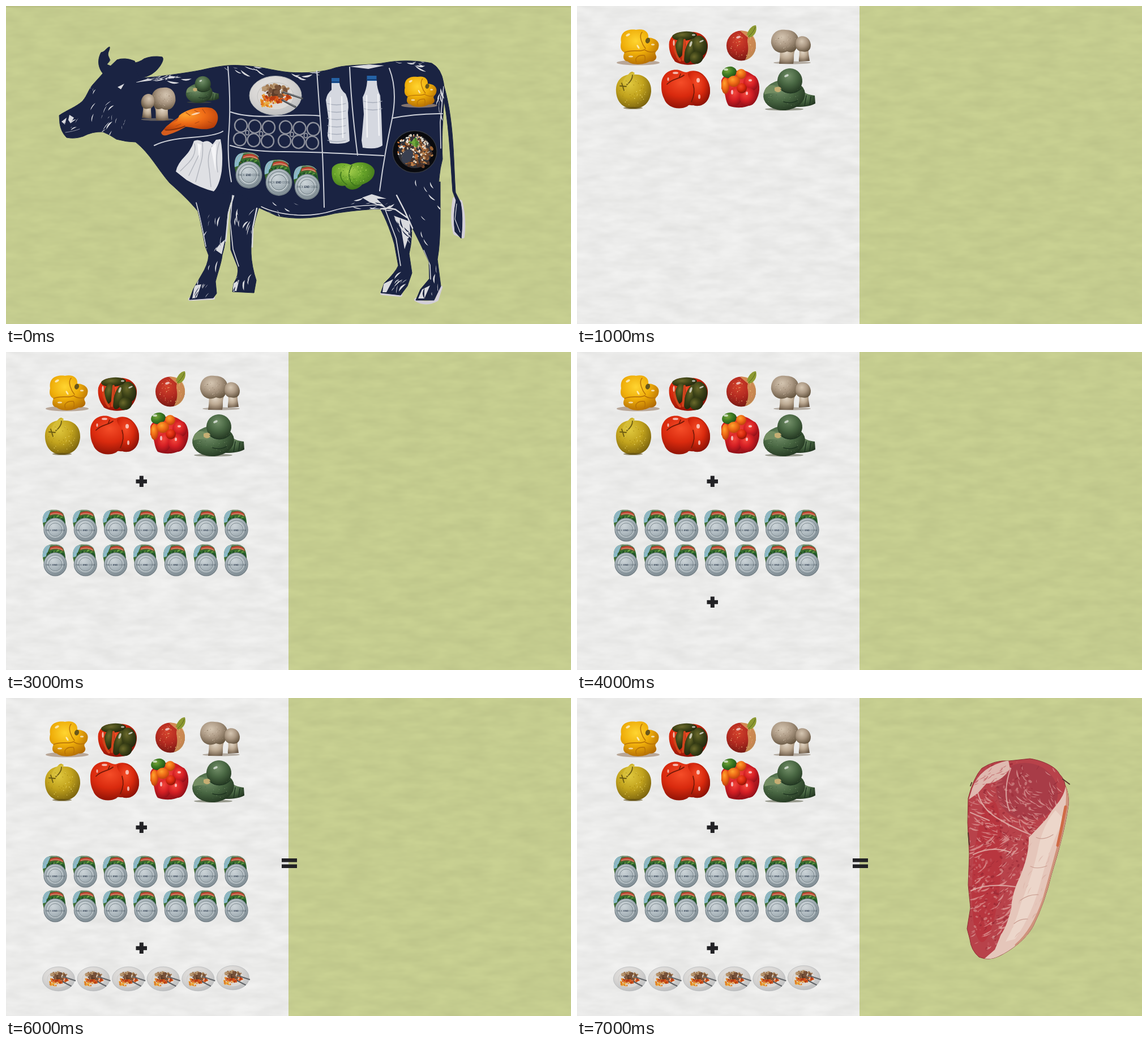
Write an HTML page that moves like this. It is 998 px wide and 561 px high and loops after 8 s.

```html
<!DOCTYPE html>
<html lang="en">
<head>
<meta charset="utf-8">
<title>Food waste</title>
<style>
html, body { margin: 0; width: 100%; height: 100%; overflow: hidden; background: #c4cc8e; }
svg { display: block; width: 100vw; height: 100vh; }
</style>
</head>
<body>
<svg id="stage" viewBox="0 0 998 561" preserveAspectRatio="none"></svg>
<script>
const LOOP = 8000;
const NAVY = '#1a2342', CHALK = '#d9dade', INK = '#222225';

function rng(seed) {
  return () => {
    seed = seed + 0x6D2B79F5 | 0;
    let t = Math.imul(seed ^ seed >>> 15, 1 | seed);
    t = t + Math.imul(t ^ t >>> 7, 61 | t) ^ t;
    return ((t ^ t >>> 14) >>> 0) / 4294967296;
  };
}
const range = (n, f) => Array.from({ length: n }, (_, i) => f(i)).join('');
const path = (d, fill, extra = '') => `<path d="${d}" fill="${fill}" ${extra}/>`;
const line = (d, color, w = 1, extra = '') =>
  `<path d="${d}" fill="none" stroke="${color}" stroke-width="${w}" stroke-linecap="round" stroke-linejoin="round" ${extra}/>`;
const oval = (x, y, rx, ry, fill, turn = 0, extra = '') =>
  `<ellipse cx="${x}" cy="${y}" rx="${rx}" ry="${ry}" fill="${fill}" transform="rotate(${turn} ${x} ${y})" ${extra}/>`;
const box = (x, y, w, h, fill) => `<rect x="${x}" y="${y}" width="${w}" height="${h}" fill="${fill}"/>`;
const glow = (id, ...colors) => `<radialGradient id="${id}" cx=".4" cy=".33" r=".72">` +
  colors.map((c, i) => `<stop offset="${i / (colors.length - 1)}" stop-color="${c}"/>`).join('') + '</radialGradient>';
const shine = (x, y, rx = 3, ry = 1.5, turn = 0) => oval(x, y, rx, ry, '#fff', turn, 'opacity=".65"');

// Random dabs inside an ellipse.
function dabs(seed, n, x, y, rx, ry, size, colors) {
  const r = rng(seed);
  return range(n, () => {
    const a = r() * 6.283, d = Math.sqrt(r()), s = size * (.6 + r() * .8);
    const color = colors[Math.floor(r() * colors.length)];
    return oval((x + Math.cos(a) * d * rx).toFixed(1), (y + Math.sin(a) * d * ry).toFixed(1),
      s.toFixed(1), (s * .65).toFixed(1), color, Math.round(r() * 180));
  });
}

// Random slivers inside a box, leaning along the given angle.
function slivers(seed, n, x, y, w, h, angle, len) {
  const r = rng(seed);
  let d = '';
  for (let i = 0; i < n; i++) {
    const a = (angle + (r() - .5) * 50) * Math.PI / 180, l = len * (.4 + r());
    const dx = Math.cos(a) * l, dy = Math.sin(a) * l, k = .14 + r() * .24;
    d += `M${(x + r() * w).toFixed(1)} ${(y + r() * h).toFixed(1)}` +
      `q${(dx / 2 - dy * k).toFixed(1)} ${(dy / 2 + dx * k).toFixed(1)} ${dx.toFixed(1)} ${dy.toFixed(1)}` +
      `q${(-dx / 2 - dy * .05).toFixed(1)} ${(-dy / 2).toFixed(1)} ${(-dx).toFixed(1)} ${(-dy).toFixed(1)}z`;
  }
  return d;
}

const gradients =
  glow('yellow', '#ffd531', '#efae0a', '#b06a04') + glow('olive', '#6c6a2c', '#3d4317', '#20240d') +
  glow('red', '#f54d28', '#d92a0e', '#861005') + glow('crimson', '#f4493d', '#d51f24', '#8a0f18') +
  glow('orange', '#ffa42f', '#ef6b16', '#b53d0a') + glow('zest', '#e0c83e', '#c2a31d', '#77600e') +
  glow('blush', '#d4432c', '#b32a20', '#701812') + glow('cap', '#d5c6b2', '#ab9883', '#64543f') +
  glow('stem', '#e2d6c5', '#bca992', '#6e5c49') + glow('moss', '#74906a', '#486642', '#223520') +
  glow('lime', '#a3cf4c', '#66a229', '#376b17') + glow('leaf', '#7aa33a', '#3c7a22', '#1f4a15') +
  glow('lid', '#ccd4d8', '#aeb9bf', '#828f96') + glow('dish', '#e6e4e2', '#d8d6d4', '#bcbdbe');

const art = {
  pepper:
    oval(108, 100, 38, 4.5, '#a8917c', 0, 'opacity=".75"') +
    path('M78 64C75 45 90 40 104 42C119 39 127 46 126 56C139 56 147 64 144 73C143 80 136 80 139 86C143 92 137 99 128 98C118 104 98 105 90 98C82 97 80 90 84 82C77 79 76 72 78 64Z', 'url(#yellow)') +
    line('M84 82C96 76 112 82 119 77C126 82 134 82 138 80M105 99C101 92 108 86 119 87C122 92 120 98 118 100M115 46C108 53 116 69 121 75', '#b97408', 1.6) +
    oval(125, 61, 4, 5, '#69571b', 20) + shine(90, 51, 4, 2, -30) + shine(108, 72, 4, 1.5, 60) + shine(134, 68) + shine(95, 89, 4, 1.5),
  gnarl:
    path('M163 63C168 47 181 44 196 47C211 42 230 52 231 68C232 86 220 102 205 103C190 106 171 99 172 96C166 89 161 76 163 63Z', 'url(#red)') +
    oval(190, 53, 22, 8, 'url(#olive)', -4) + oval(182, 73, 9, 19, 'url(#olive)', 12) + oval(200, 79, 9, 23, 'url(#olive)', 18) +
    oval(217, 70, 13, 18, 'url(#olive)', -12) + oval(211, 91, 12, 11, 'url(#olive)', -35) +
    line('M171 63C172 79 175 89 182 96M190 60L187 95', '#d0441c', 4) +
    shine(171, 65, 1.5, 5) + shine(201, 67, 2, 5, 20) + shine(220, 62, 4, 1.5, -25) + shine(206, 51),
  peach:
    oval(290, 70, 26, 26.5, 'url(#blush)') +
    path('M288 44C309 42 317 56 316 72C314 87 306 94 297 95C308 74 298 64 302 56Z', '#e0b46a', 'opacity=".7"') +
    path('M300 51C302 42 310 33 316 34C319 43 314 54 304 56Z', '#8d9a32') + line('M303 54Q312 46 315 37', '#59681e') +
    dabs(4, 45, 290, 70, 23, 23, .7, ['#e9866a', '#f0cf88']) + shine(285, 55, 4, 2, -20),
  mushroom:
    oval(380, 100, 33, 2.5, '#8f8274', 0, 'opacity=".6"') +
    path('M357 72C360 82 358 94 357 102L382 102C385 91 380 84 388 74Z', 'url(#stem)') +
    path('M391 74C395 83 391 92 392 98L411 97C410 88 408 83 409 73Z', 'url(#stem)') +
    path('M343 66C342 50 352 40 368 42C386 42 395 54 390 69C386 82 379 83 371 80C361 85 347 83 343 66Z', 'url(#cap)') +
    path('M387 61C391 49 411 51 413 68C413 80 405 82 397 80C389 80 384 73 387 61Z', 'url(#cap)') +
    dabs(8, 30, 369, 61, 21, 16, 1, ['#c9b9a4', '#96836d']),
  lemon:
    path('M69 151C68 132 79 123 91 121C94 114 103 115 99 121C119 119 132 132 131 151C129 172 116 181 100 181C82 182 70 169 69 151Z', 'url(#zest)') +
    path('M80 137C83 124 94 116 101 117C104 122 94 126 88 139Z', '#d6be38') +
    line('M76 141L87 142M79 136L83 149M88 139Q98 131 98 122', '#6c5b13', 1.8) +
    dabs(12, 55, 100, 152, 26, 25, .8, ['#e9d568', '#a98912']) + oval(99, 180, 17, 2, '#5b4a14', 0, 'opacity=".6"'),
  tomato:
    path('M149 141C148 121 163 110 180 113C190 117 193 118 199 115C218 110 235 128 235 149C235 169 221 180 205 175C201 176 198 173 195 177C180 185 159 179 154 164C150 156 149 149 149 141Z', 'url(#red)') +
    path('M196 119C205 111 235 121 235 149C235 173 213 180 205 173C199 162 209 146 205 136C201 131 196 126 196 119Z', 'url(#red)') +
    line('M159 138C169 127 179 130 189 122L180 127L183 120M205 138Q210 153 202 169', '#761a08', 1.8) +
    shine(174, 118, 5, 2) + shine(161, 129, 1.5, 3) + shine(214, 131, 3, 4) + shine(216, 160, 2, 4),
  capsicum:
    path('M255 132C258 120 278 112 296 114C306 117 310 122 315 124C324 134 324 151 318 163C313 176 290 184 268 176C260 164 264 152 255 146Z', 'url(#crimson)') +
    oval(269, 117, 13, 10, 'url(#leaf)', -12) + oval(290, 120, 9, 9, 'url(#orange)') + oval(262, 141, 7, 14, 'url(#orange)') +
    oval(277, 133, 11, 10, 'url(#orange)') + oval(307, 136, 13, 14, 'url(#crimson)') + oval(279, 160, 13, 18, 'url(#crimson)', 18) +
    oval(302, 160, 15, 16, 'url(#crimson)', -12) + oval(291, 145, 9, 9, 'url(#red)') +
    shine(274, 152, 2, 4) + shine(306, 131, 3, 2) + shine(300, 154, 2, 3) + shine(263, 112, 4, 2),
  squash:
    oval(366, 182, 34, 2.5, '#50543e', 0, 'opacity=".55"') +
    path('M394 147C402 154 410 157 420 158L421 172C410 178 397 178 385 178Z', 'url(#moss)') +
    oval(366, 157, 37, 27, 'url(#moss)', -5) + oval(376, 132, 22, 22, 'url(#moss)', 15) +
    path('M331 151C334 138 346 137 354 143C361 146 361 153 353 154C343 153 339 154 331 156Z', '#738d62') +
    path('M349 144C354 142 361 141 361 148C360 153 352 153 349 149Z', '#c6ae73') +
    line('M360 147C371 157 387 155 396 145M405 158L402 176M413 160L411 174M365 169Q379 173 389 167', '#203622', 1.6) +
    shine(370, 123, 4, 2, -25) + dabs(22, 40, 366, 160, 31, 20, .6, ['#89a079', '#314b2d']),
  can:
    path('M-22 -12C-23 -27 -18 -35 -3 -35C11 -36 17 -29 18 -12L19 2L-18 8Z', '#3c6c30') +
    path('M-22 -12C-23 -27 -18 -34 -8 -34L-12 -25L-16 -14Z', '#8ab9c8') +
    path('M-9 -30Q4 -36 13 -28L15 -23Q3 -30 -10 -25Z', '#c04434') +
    path('M-15 -20Q2 -27 16 -19L18 -11Q0 -18 -17 -9Z', '#22592a') +
    dabs(17, 24, 0, -19, 16, 7, 1.5, ['#6ea545', '#1c4a23', '#4d8a36', '#a94a2c']) +
    line('M-8 -27Q4 -31 13 -25', '#d5b48a', 1) +
    line('M-20 -20Q-16 -34 -3 -34Q9 -35 15 -28', '#a0a9a8', 1) +
    oval(0, 0, 20.6, 21, '#77838a') + oval(0, -.5, 19.4, 19.6, 'url(#lid)') +
    '<g fill="none" stroke="#78858c" stroke-width="1"><circle r="16.5"/><circle r="13" stroke="#dde3e5"/><circle r="12"/></g>' +
    '<text y="2" text-anchor="middle" font-family="Liberation Sans, sans-serif" font-size="4.2" fill="#4b5964">PACK <tspan font-weight="bold" fill="#28364a">END</tspan> CODE</text>',
  plate:
    oval(-1, 0, 46, 34.5, 'url(#dish)') + oval(-1, 0, 46, 34.5, 'none', 0, 'stroke="#aeb2b4"') + oval(-1, 1, 32, 24, '#dcd9d6', 0, 'stroke="#c3c2c0"') +
    dabs(31, 45, -13, 9, 19, 11, 2.6, ['#e9a63a', '#eab64f', '#e07a20', '#cf5a1a']) +
    dabs(32, 50, 2, 4, 24, 7, 3.4, ['#d8591a', '#e86d22', '#b53b14']) +
    dabs(33, 38, -1, -9, 23, 10, 4.4, ['#79533a', '#a27a53', '#5d3d29', '#b8966f']) +
    line('M13 -6L46 5M11 8L34 20', '#4d5054', 3.4) + line('M13 -7L45 4M12 7L33 19', '#989c9f', 1),
};

const put = (id, ox, oy, x, y, sx, sy = sx) =>
  `<use href="#${id}" transform="translate(${x} ${y}) scale(${sx} ${sy}) translate(${-ox} ${-oy})"/>`;

// Cow
const torso = 'M172 118L196 95Q210 90 227 97Q238 120 237 127C270 125 320 118 345 113C370 107 395 103 415 105C450 106 470 114 500 117C530 119 560 117 582 109C608 102 640 106 676 99C702 95 732 97 752 101Q769 110 773 136C776 170 768 215 771 270Q762 302 765 345L700 371L662 358C630 359 606 362 580 366C545 375 510 377 478 370L447 356L398 335L388 360L339 362C325 345 308 329 289 312C268 288 255 261 229 240Q213 240 195 235Q182 226 171 222Q153 221 136 230Q121 235 107 232Q97 222 95 207L94 193C107 184 124 178 135 168C145 156 145 148 154 138Z';
const horn = 'M172 120C160 106 163 91 168 82C175 81 177 74 183 72C184 78 178 82 181 89L184 96L178 103L190 108Z';
const ear = 'M222 101Q235 100 244 93Q259 87 276 90Q280 94 272 106Q260 124 237 127Z';
const legs = [
  'M333 345C342 366 346 395 352 424L358 440Q357 456 345 475L331 499L324 518L366 515L372 507L370 486C375 467 381 451 382 439C392 407 387 381 393 358L402 325Z',
  'M400 325C395 362 396 390 397 430L409 460Q412 474 402 490L400 504L438 506L442 484Q434 460 433 437C432 405 438 382 448 351Z',
  'M654 345C667 366 678 392 686 420L693 458Q688 470 668 489L662 506L697 510L709 494L717 471L712 437Q719 409 716 365Z',
  'M684 337C704 364 718 391 732 420L747 451L748 481L732 500L724 519L756 519L768 494L762 447Q767 420 767 370L767 310Z'];
const tail = 'M766 135C782 187 784 258 789 327L795 343Q789 371 793 398L804 410Q808 371 803 347L794 329C790 271 792 198 771 132Z';
// Parts stay separate so that overlaps do not cancel out.
const body = [torso, horn, ear, ...legs].map(d => path(d, NAVY)).join('');

const cuts = 'M392 107Q398 178 393 230Q391 275 398 310M397 187Q425 197 480 194T555 194M549 114Q552 159 556 211T562 355' +
  'M396 246Q432 257 490 257T667 264M607 108Q610 178 621 263M677 110Q692 148 682 199C675 231 666 279 660 326' +
  'M682 198Q722 190 771 190M262 246Q284 235 327 232T383 221';

const marks =
  slivers(51, 9, 150, 125, 50, 75, 118, 12) + slivers(52, 10, 176, 175, 42, 46, 115, 14) + slivers(53, 5, 104, 196, 25, 18, 145, 9) +
  slivers(54, 11, 240, 126, 70, 7, -12, 20) + slivers(55, 10, 354, 365, 32, 95, 106, 15) + slivers(56, 10, 400, 350, 40, 62, 108, 15) +
  slivers(57, 9, 334, 475, 36, 35, 115, 15) + slivers(58, 8, 405, 465, 31, 35, 100, 14) + slivers(59, 9, 681, 365, 32, 58, 60, 17) +
  slivers(60, 9, 680, 455, 32, 45, 120, 15) + slivers(61, 11, 714, 305, 48, 125, 60, 12) + slivers(62, 9, 735, 455, 28, 57, 105, 14) +
  slivers(63, 11, 605, 343, 70, 17, -8, 18) + slivers(64, 8, 384, 106, 65, 7, 12, 17) + slivers(65, 7, 497, 115, 65, 10, 5, 15) +
  slivers(66, 11, 670, 97, 80, 8, 12, 17) + slivers(67, 8, 763, 145, 6, 55, 90, 17) + slivers(68, 6, 440, 345, 70, 20, 30, 14);

const patches = 'M372 425L387 412L381 438L371 431ZM333 493L345 491L337 514L329 516ZM685 370L713 380L714 400L704 429L698 394Z' +
  'M629 338L646 332L672 340L655 340L671 356L642 346ZM607 107L640 103L668 105L640 111ZM228 135L275 121L310 126L268 130Z' +
  'M401 490L412 483L407 503L401 502ZM667 490L684 482L672 505L665 505ZM735 500L749 493L739 516L728 516Z' +
  'M185 92L189 97L182 100ZM98 204L107 197L104 209Z';

const ring = (x, y) => oval(x, y, 11, 11.5, 'none', -8, 'stroke="#8e919c" stroke-width="2.4"');
const rings = (x, y) => range(6, i => ring(x + i % 3 * 24.5 - (i > 2 ? 2 : 0), y + i % 3 * 1.6 + (i > 2 ? 24 : 0))) +
  range(2, i => oval(x + 11 + i * 24.5, y + 12.5 + i * 2, 3, 4, 'none', 0, 'stroke="#8e919c" stroke-width="2"'));

const bag =
  path('M332 238Q340 234 348 240Q357 235 365 244L371 236L379 235Q384 261 381 291Q377 317 367 327Q343 321 319 307L300 292Q302 279 318 263Q328 252 332 238Z', '#dfe0e4') +
  line('M333 243Q337 261 323 276L308 291M347 242Q349 264 343 281L335 310M364 247Q354 266 359 289L362 319M377 240Q369 264 374 293M342 260L323 299', '#b2b5bd', 1.4) +
  path('M338 242L345 245L341 272ZM362 250L371 242L370 292Z', '#f5f5f7');
const carrots =
  path('M314 192Q292 201 274 223Q275 230 284 228Q307 221 325 208Z', '#d55c1d') +
  path('M306 193C320 181 345 176 363 180C379 187 376 206 367 214C350 222 330 213 316 213Q296 222 279 219Q282 209 302 203Z', 'url(#orange)') +
  line('M318 188L325 193M333 184L341 188M347 182L352 189M309 208L300 212M357 204L365 207M334 207L341 204', '#b44c14', 1.2) +
  line('M282 219Q300 219 316 212', '#7d300c', 1.5) + shine(335, 190, 8, 1.5, -15);
const bottle = (x, y, d, ribs, cap) =>
  path(d, '#d5d8e0') + box(x - cap / 2, y, cap, 9, '#2563a6') + box(x - cap / 2, y + 6, cap, 2, '#153f78') +
  range(ribs, i => line(`M${x - 14} ${y + 45 + i * 13}q16 5 32 0`, '#a7adba', 1.3)) +
  line(`M${x - 9} ${y + 35}l1 73M${x + 11} ${y + 33}l2 72`, '#fff', 2.4, 'opacity=".7"');
const lump =
  path('M576 286C582 275 599 276 609 280C625 271 647 277 651 290C652 305 638 312 629 315C619 327 604 326 599 317C581 320 573 306 576 286Z', 'url(#lime)') +
  line('M611 281Q602 296 609 309Q615 321 625 316M602 315Q588 306 592 293', '#3e761c', 1.7) +
  dabs(72, 75, 613, 297, 34, 18, .8, ['#b3da60', '#4a8421']);
const bowl =
  oval(722, 257, 39, 37, '#090a0e', 0, 'stroke="#343842" stroke-width="1.3"') + oval(722, 257, 30, 29, '#33343a') +
  dabs(81, 80, 727, 260, 27, 24, 3.4, ['#75482b', '#9f6435', '#bd834d', '#4c3126']) +
  dabs(82, 130, 719, 252, 29, 25, 1.8, ['#e6dfcf', '#d0bca2', '#c87033', '#ede7dd']) +
  dabs(83, 13, 722, 241, 8, 7, 3, ['#4d8a2c', '#74a83d']) + oval(709, 265, 9, 13, '#3a4050', 30);

const cow =
  box(0, 0, 998, 2.5, '#b9c083') +
  line('M792 340Q786 375 793 401L807 407Q811 375 803 345M724 518Q742 529 761 518L768 496M664 507L697 510M325 517L366 515', '#d3cfd8', 6) +
  `<g stroke="${NAVY}" stroke-linejoin="round">${body}${path(tail, NAVY)}</g>` +
  `<g clip-path="url(#hide)">${path(marks + patches, CHALK)}` +
  line('M451 354Q477 367 517 369Q550 370 578 361T660 351M336 347Q344 377 353 424M400 334L396 381L401 429L411 459M669 357L689 410L697 458M738 431L749 457L750 482M773 142L767 205L768 251', CHALK, 1.6) + '</g>' +
  line('M388 415L393 365L402 335M443 357L436 390L435 425M662 358Q675 355 688 359L708 373M690 334L704 361L718 392', CHALK, 2.4) +
  line('M796 349L793 376L802 399', CHALK, 1.2) +
  path('M112 192L120 197L114 207L110 201ZM197 143L209 137L203 147Z', CHALK) +
  line('M105 223Q120 221 130 217', '#8e93a4', 1) +
  line(cuts, '#cdd0d8', 2) +
  put('mushroom', 378, 72, 269, 173, -.87, .97) + put('squash', 375, 148, 347, 148, .64) + put('pepper', 107, 73, 729, 152, .84, .87) +
  carrots + bag + put('plate', 0, 0, 477, 158, 1) + rings(415, 211) + rings(494, 214) +
  put('can', 0, 0, 429, 298, 1.14) + put('can', 0, 0, 482, 311, 1.14) + put('can', 0, 0, 532, 319, 1.08) +
  bottle(582, 127, 'M575 136L589 136Q590 147 600 155Q607 170 604 188L607 238Q599 245 572 242L568 229L570 202L565 166Q567 154 575 148Z', 6, 14) +
  bottle(646, 123, 'M638 132L655 132Q655 145 661 158L663 190L665 246Q655 254 630 250L628 237L632 191L630 161Q637 148 638 132Z', 2, 17) +
  lump + bowl;

// Sum
const plus = y => box(229.5, y - 3.2, 19.5, 7, INK) + box(235.8, y - 9.5, 7, 19.5, INK);
const produce = ['pepper', 'gnarl', 'peach', 'mushroom', 'lemon', 'tomato', 'capsicum', 'squash']
  .map(id => `<use href="#${id}"/>`).join('');
const cans = range(14, i => put('can', 0, 0, 87 + i % 7 * 53.35, i < 7 ? 313.5 : 374.5, 1));
const plates = range(6, i => put('plate', 0, 0, 93.5 + i * 61.6, i < 5 ? 495.5 : 493.5, .62));
const equals = box(487, 283, 27, 6.5, INK) + box(487, 293.5, 27, 6.5, INK);

const slab = 'M800 107C827 111 848 124 852 134Q861 143 862 153Q870 171 868 189C862 231 849 276 838 311Q827 359 806 402C790 431 759 449 744 456Q727 464 710 457Q696 445 694 426L689 407L695 370L691 330L693 275L690 220L691 177Q700 141 715 124Q738 109 763 111Z';
const steak =
  path(slab, '#b8424a', 'stroke="#8b3034"') +
  '<g clip-path="url(#slab)">' +
  oval(795, 165, 55, 50, '#a83c47', 20) + oval(724, 305, 25, 126, '#b8363f', 4) +
  `<g opacity=".55">${dabs(90, 420, 752, 280, 72, 180, 2.6, ['#d27f82', '#c4565e', '#9c2a37', '#dba09c', '#8f2431'])}</g>` +
  path(slivers(91, 120, 690, 160, 140, 90, 25, 14) + slivers(92, 130, 688, 250, 108, 195, -38, 15) + slivers(93, 45, 760, 115, 90, 105, 58, 14), '#e6b3ae', 'opacity=".6"') +
  path(slivers(94, 110, 688, 115, 165, 325, -35, 10), '#7f1c2b', 'opacity=".4"') +
  path('M698 160Q711 121 762 110L765 125Q748 150 723 151L708 168L692 179Z', '#dfb9b0') +
  path(slivers(95, 45, 697, 120, 60, 42, -30, 12), '#bd5a5f', 'opacity=".7"') +
  line('M708 167Q714 194 741 211T801 241M766 124Q751 166 764 199M695 202L728 216M700 276Q734 260 765 272M696 340Q725 326 774 333', '#e2b5ae', 2.2, 'opacity=".8"') +
  path('M863 156C859 180 842 191 831 211Q811 233 798 246Q799 276 782 316Q768 345 767 371Q759 404 749 417L738 444L716 463L755 466L824 390L880 185Z', '#e5c6ba') +
  path('M845 198Q823 224 815 264T784 363Q774 400 757 430L774 425Q804 383 820 321T860 214Z', '#ecd6ca') +
  line('M865 153Q870 184 858 232T825 354Q806 410 776 436', '#c98267', 5, 'opacity=".75"') +
  line('M863 192L855 233L849 260', '#cf6b46', 5) +
  line('M841 241Q824 252 811 246M830 296Q813 303 801 297M815 347Q798 346 783 357M796 390Q783 389 772 398', '#c99d90', 1.2) +
  path(slivers(96, 30, 770, 225, 75, 200, 115, 13), '#cfa195', 'opacity=".45"') + '</g>' +
  line('M858 143L870 152M695 155Q698 147 697 150M691 238L693 259', '#57382e', 2);

const split = box(0, 0, 499, 561, '#f1f1f0');
const paper = '<filter id="paper" x="0" y="0" width="1" height="1" color-interpolation-filters="sRGB">' +
  '<feTurbulence type="fractalNoise" baseFrequency=".02 .06" numOctaves="3" seed="7"/>' +
  '<feColorMatrix values="0 0 0 0 .1  0 0 0 0 .1  0 0 0 0 .08  0 0 0 .09 -.017"/></filter>';

// Each layer: start, end, markup.
const scenes = [
  [1000, LOOP, split],
  [0, LOOP, '<rect width="998" height="561" filter="url(#paper)"/>'],
  [0, 1000, cow],
  [1000, LOOP, produce],
  [2000, LOOP, plus(228)],
  [3000, LOOP, cans],
  [4000, LOOP, plus(441)],
  [5000, LOOP, plates],
  [6000, LOOP, equals],
  [7000, LOOP, steak],
];

const stage = document.getElementById('stage');
stage.innerHTML = `<defs>${gradients}${paper}` +
  Object.entries(art).map(([id, shapes]) => `<g id="${id}">${shapes}</g>`).join('') +
  `<clipPath id="hide">${body}</clipPath><clipPath id="slab"><path d="${slab}"/></clipPath></defs>` +
  box(0, 0, 998, 561, '#c9d192') +
  scenes.map(s => `<g class="layer">${s[2]}</g>`).join('');
const layers = [...stage.querySelectorAll('.layer')];

let step = -1;
function update(t) {
  const now = Math.floor(t % LOOP / 1000);
  if (now === step) return;
  step = now;
  layers.forEach((el, i) => {
    const [from, to] = scenes[i];
    el.style.display = now * 1000 >= from && now * 1000 < to ? '' : 'none';
  });
}

const start = performance.now();
function tick() {
  update(performance.now() - start);
  requestAnimationFrame(tick);
}
tick();
</script>
</body>
</html>
```
